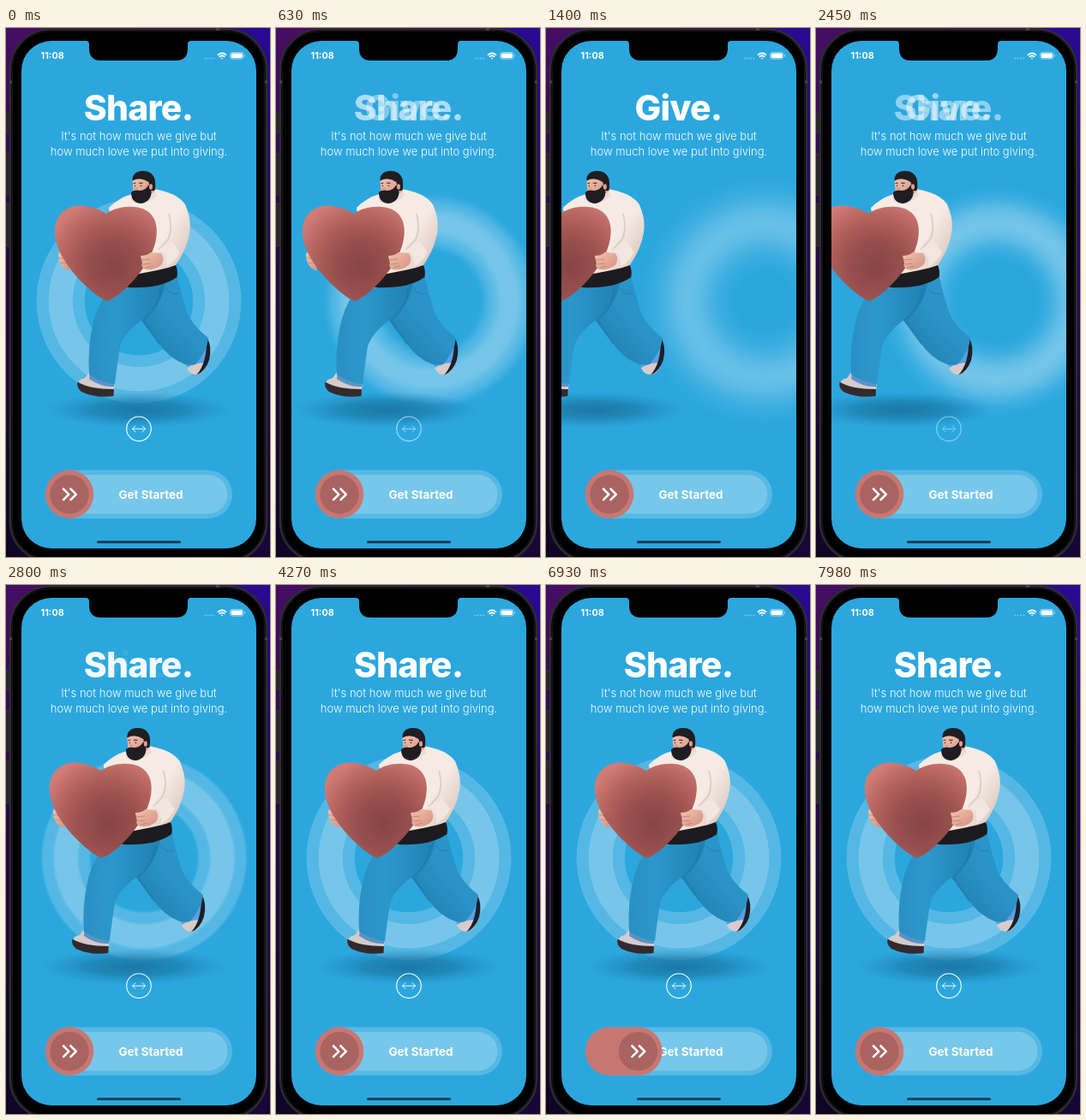
Animation, 308 px wide and 618 px high, one loop 8000 ms. Source, as an HTML page:

```html
<!DOCTYPE html>
<html lang="en">
<head>
<meta charset="utf-8">
<title>Onboarding</title>
<style>
@property --drag { syntax: '<number>'; inherits: true; initial-value: 0; }
@property --give { syntax: '<number>'; inherits: true; initial-value: 0; }
@property --slide { syntax: '<number>'; inherits: true; initial-value: 0; }

html, body { margin: 0; width: 100%; height: 100%; overflow: hidden; background: #140a2c; }
svg {
  display: block; width: 100vw; height: 100vh;
  font-family: Inter, Roboto, sans-serif;
  animation: drag 8s infinite, give 8s infinite, slide 8s infinite;
}

@keyframes drag {
  0% { --drag: 0; }
  5.875% { --drag: 0; animation-timing-function: cubic-bezier(.5, 1, .89, 1); }
  21.125% { --drag: 106; }
  27.75% { --drag: 106; animation-timing-function: ease-out; }
  36.75%, 100% { --drag: 0; }
}
@keyframes give {
  0% { --give: 0; }
  5.875% { --give: 0; animation-timing-function: ease-out; }
  13.5% { --give: 1; }
  27.75% { --give: 1; animation-timing-function: ease-out; }
  36.75%, 100% { --give: 0; }
}
@keyframes slide {
  0% { --slide: 0; }
  61.875% { --slide: 0; animation-timing-function: ease-in-out; }
  72.625% { --slide: 115; animation-timing-function: ease-in-out; }
  82.875% { --slide: 40; }
  86.125% { --slide: 40; animation-timing-function: ease-out; }
  91.125%, 100% { --slide: 0; }
}

#hero { transform: translateX(calc(var(--drag) * -1px)); }
#rings {
  transform: translateX(calc(var(--drag) * 1px));
  filter: blur(calc(var(--drag) * .17px));
}
#share, #hint { opacity: calc(1 - var(--give)); }
#give { opacity: var(--give); }
#track { width: calc(56px + var(--slide) * 1px); }
#knob { transform: translateX(calc(var(--slide) * 1px)); }

text { fill: #fff; }
.mid { text-anchor: middle; }
.title { font-size: 41px; font-weight: 800; letter-spacing: -.8px; }
.sub { font-size: 13px; font-weight: 300; }
.cta { font-size: 13.5px; font-weight: 700; }
.time { font-size: 10.8px; font-weight: 700; }
.line { fill: none; stroke: #fff; stroke-linecap: round; stroke-linejoin: round; }
</style>
</head>
<body>
<svg viewBox="0 0 308 618" preserveAspectRatio="none">
  <defs>
    <linearGradient id="wallLeft" x2="0" y2="1">
      <stop offset="0" stop-color="#460e66"/>
      <stop offset=".4" stop-color="#220a48"/>
      <stop offset="1" stop-color="#0f0524"/>
    </linearGradient>
    <linearGradient id="wallRight" x2="0" y2="1">
      <stop offset="0" stop-color="#2a0a92"/>
      <stop offset=".4" stop-color="#220a5c"/>
      <stop offset="1" stop-color="#160636"/>
    </linearGradient>
    <radialGradient id="shade">
      <stop offset="0" stop-color="#176a95" stop-opacity=".8"/>
      <stop offset=".5" stop-color="#18709c" stop-opacity=".55"/>
      <stop offset="1" stop-color="#1c7fb0" stop-opacity="0"/>
    </radialGradient>
    <radialGradient id="heart" gradientUnits="userSpaceOnUse" cx="126" cy="279" r="82">
      <stop offset="0" stop-color="#874543"/>
      <stop offset=".4" stop-color="#98504e"/>
      <stop offset=".72" stop-color="#b5635f"/>
      <stop offset="1" stop-color="#d07c75"/>
    </radialGradient>
    <linearGradient id="wool" x1="0" x2="1" y2=".7">
      <stop offset="0" stop-color="#f7ebe4"/>
      <stop offset=".7" stop-color="#f6ebe4"/>
      <stop offset="1" stop-color="#dccac1"/>
    </linearGradient>
    <linearGradient id="front" x2="1">
      <stop offset="0" stop-color="#2a8fc2"/>
      <stop offset=".35" stop-color="#2c97cb"/>
      <stop offset="1" stop-color="#2080b2"/>
    </linearGradient>
    <linearGradient id="back" x1="0" y1="1" x2="1" y2="0">
      <stop offset="0" stop-color="#1d77a8"/>
      <stop offset=".55" stop-color="#2a92c6"/>
      <stop offset="1" stop-color="#2b96cb"/>
    </linearGradient>
    <linearGradient id="skin" x2="1" y2="1">
      <stop offset="0" stop-color="#f3c3b0"/>
      <stop offset="1" stop-color="#d3917e"/>
    </linearGradient>
    <clipPath id="screen"><rect x="18" y="15" width="274" height="593" rx="35"/></clipPath>
  </defs>

  <!-- phone body -->
  <rect width="154" height="618" fill="url(#wallLeft)"/>
  <rect x="154" width="154" height="618" fill="url(#wallRight)"/>
  <g fill="#29272e" stroke="#38363e" stroke-width=".8">
    <rect x="-3" y="100" width="9" height="22" rx="1.5"/>
    <rect x="-3" y="147" width="9" height="48" rx="1.5"/>
    <rect x="-3" y="205" width="9" height="50" rx="1.5"/>
  </g>
  <rect x="5" y="1.5" width="299" height="622" rx="47" fill="#000" stroke="#2d2b32" stroke-width="2.6"/>
  <rect x="7.5" y="4" width="294" height="617" rx="44" fill="none" stroke="#17161a"/>
  <path d="M4 63h3M302 63h3M245 1.5h4" stroke="#46444c" stroke-width="3"/>

  <g clip-path="url(#screen)">
    <rect x="18" y="15" width="274" height="593" fill="#2ba7de"/>

    <g id="rings" fill="none" stroke="#fff" stroke-opacity=".2">
      <circle cx="155" cy="319" r="91.3" stroke-width="28.1"/>
      <circle cx="155" cy="319" r="91.3" stroke-width="56.2"/>
    </g>

    <g id="hero">
      <ellipse cx="155" cy="446" rx="108" ry="21" fill="url(#shade)"/>

      <!-- shoes -->
      <path d="M209 391L231 362Q239 364 238 378Q237 396 227 404Q219 406 213 400Z" fill="#5b9fe2"/>
      <path d="M211 397Q222 390 235 391Q232 402 224 405Q215 406 211 397Z" fill="#d9cbca"/>
      <path d="M234 361Q241 372 237 388Q232 402 222 405.500Q235 392 234 361Z" fill="#1d1f28"/>
      <path d="M97 402L127 410L126 425Q104 430 84 417Q84 410 92 409Z" fill="#d6cbca"/>
      <path d="M98 402L127 410L126 419Q112 420 97 410Z" fill="#5a93c8"/>
      <path d="M83.500 413.500Q98 422 126 422L125.500 430Q105 433 88 425Q82 420 83.500 413.500Z" fill="#332a2d"/>

      <!-- trousers -->
      <path d="M143 300L199 288Q204 309 211 332Q217 347 236 362Q235 377 221 393Q215 394 209 393Q190 386 178 368L155 338Z" fill="url(#back)"/>
      <path d="M118 308L186 297Q184 320 163 338Q139 354 133 372Q130 392 127 416Q111 414 97 405Q95 374 101 348Q105 327 118 308Z" fill="url(#front)"/>
      <path d="M180 304Q180 325 160 341Q169 355 179 369" fill="none" stroke="#1d6d9c" stroke-width="2.500" opacity=".35"/>
      <path d="M187 304Q191 313 202 310" fill="none" stroke="#1f75a6" opacity=".6"/>

      <!-- hoodie -->
      <path d="M125 295L197 275Q201 282 199.500 291Q180 305 142 303Z" fill="#1c1b20"/>
      <path d="M120 210Q132 198 147 194L172 188Q199 192 209 206Q217 224 214 240Q211 258 198 277Q184 283 130 291Z" fill="url(#wool)"/>
      <path d="M190 217Q195 234 189 247L178 259" fill="none" stroke="#cdb9b0" stroke-width="2" opacity=".55"/>
      <path d="M146 202Q159 211 176 196L173 188Q160 191 146 198Z" fill="#eaddd5"/>

      <!-- head -->
      <path d="M147.500 178Q156 172 171 178L173 191Q163 199 149 196Z" fill="url(#skin)"/>
      <path d="M147.500 178.500Q147 168.500 158 167Q170 166 173.500 176Q175 184 173.500 190L168.500 190L166.500 180Q157 173.500 147.500 178.500Z" fill="#1f1e22"/>
      <path d="M146 192Q150 188.500 156 190Q163 190 166.500 183L169.500 191Q170 202 158 205Q146 204.500 146 192Z" fill="#1f1d22"/>
      <path d="M148.500 181.500l3-.5M155 181l4.500 .4" stroke="#3a2a29" stroke-width="1.200"/>
      <circle cx="150.500" cy="184.200" r=".7" fill="#2a2020"/>
      <circle cx="157.500" cy="184.200" r=".8" fill="#2a2020"/>
      <ellipse cx="151.500" cy="187.500" rx="2.200" ry="1.700" fill="#e09d8b"/>
      <ellipse cx="169" cy="185.500" rx="2" ry="3.300" fill="#dfa08d"/>

      <!-- heart and hands -->
      <path d="M70 262Q60 260 61 266Q62 280 74 284Z" fill="url(#skin)"/>
      <path d="M61 268l8 2M63 274l8 1" stroke="#c58472" stroke-width=".8"/>
      <path d="M118 319C103 314 60 275 57 242C55 219 70 207 87 207.500C101 208 111 213 117 217C125 211 137 208 149 209C167 210 178 222 175.500 243C172 277 134 314 118 319Z" fill="url(#heart)"/>
      <path d="M157 266Q165 266 169 262L181 263Q186 270 181 277Q172 284 162 282Q157 279 159 275Z" fill="url(#skin)"/>
      <path d="M158 271l10-1M160 276l9-1M163 280l8-2" stroke="#be7e6d" stroke-width=".8"/>
      <path d="M178 259Q189 262 187 279Q198 272 203 262L194 249Z" fill="#f2e6df"/>
    </g>

    <g id="hint" class="line">
      <circle cx="155" cy="468.300" r="14.300" stroke-width="1.100"/>
      <path d="M147.500 468.300h15M151 464.800l-3.500 3.500l3.500 3.500M159 464.800l3.500 3.500l-3.500 3.500" stroke-width=".9"/>
    </g>

    <text id="share" class="title mid" x="154.500" y="108">Share.</text>
    <text id="give" class="title mid" x="154.500" y="108">Give.</text>
    <text class="sub mid" x="155" y="131.300">It's not how much we give but</text>
    <text class="sub mid" x="155" y="148.800">how much love we put into giving.</text>

    <!-- slide button -->
    <g fill="#fff" fill-opacity=".2">
      <rect x="46" y="516.500" width="218" height="56.500" rx="28.250"/>
      <rect x="51.600" y="522.100" width="206.800" height="45.300" rx="22.650"/>
    </g>
    <rect id="track" x="46" y="516.500" height="56.500" rx="28" fill="#c77772"/>
    <text class="cta mid" x="169" y="549.800">Get Started</text>
    <g id="knob">
      <circle cx="74" cy="544.750" r="28.200" fill="#c77772"/>
      <circle cx="74" cy="544.750" r="22.700" fill="#a96360"/>
      <path class="line" d="M67 538.500l6.300 6.300l-6.300 6.300M75.500 538.500l6.300 6.300l-6.300 6.300" stroke-width="2.600"/>
    </g>

    <!-- status bar -->
    <text class="time" x="40.500" y="36.300">11:08</text>
    <path d="M231.500 35.500h12" stroke="#fff" stroke-opacity=".4" stroke-width="1.600" stroke-dasharray="1.800 1.500"/>
    <g class="line" stroke-width="1.700">
      <path d="M247.500 31.300Q252 27.400 256.500 31.300M249.300 33.400Q252 31.200 254.700 33.400"/>
      <path d="M252 35.300v.1"/>
    </g>
    <rect x="261.500" y="28.500" width="15.500" height="7.800" rx="2.300" fill="none" stroke="#fff" stroke-opacity=".55" stroke-width=".8"/>
    <rect x="262.600" y="29.600" width="13.300" height="5.600" rx="1.400" fill="#fff"/>
    <path d="M278.300 31.300v2.200" stroke="#fff" stroke-opacity=".6"/>
    <rect x="106" y="599" width="98" height="3" rx="1.500" fill="#173f58"/>
  </g>

  <!-- notch -->
  <path d="M93 14H216V15Q212 15 212 19V24Q212 38 198 38H111Q97 38 97 24V19Q97 15 93 15Z"/>
</svg>
</body>
</html>
```
